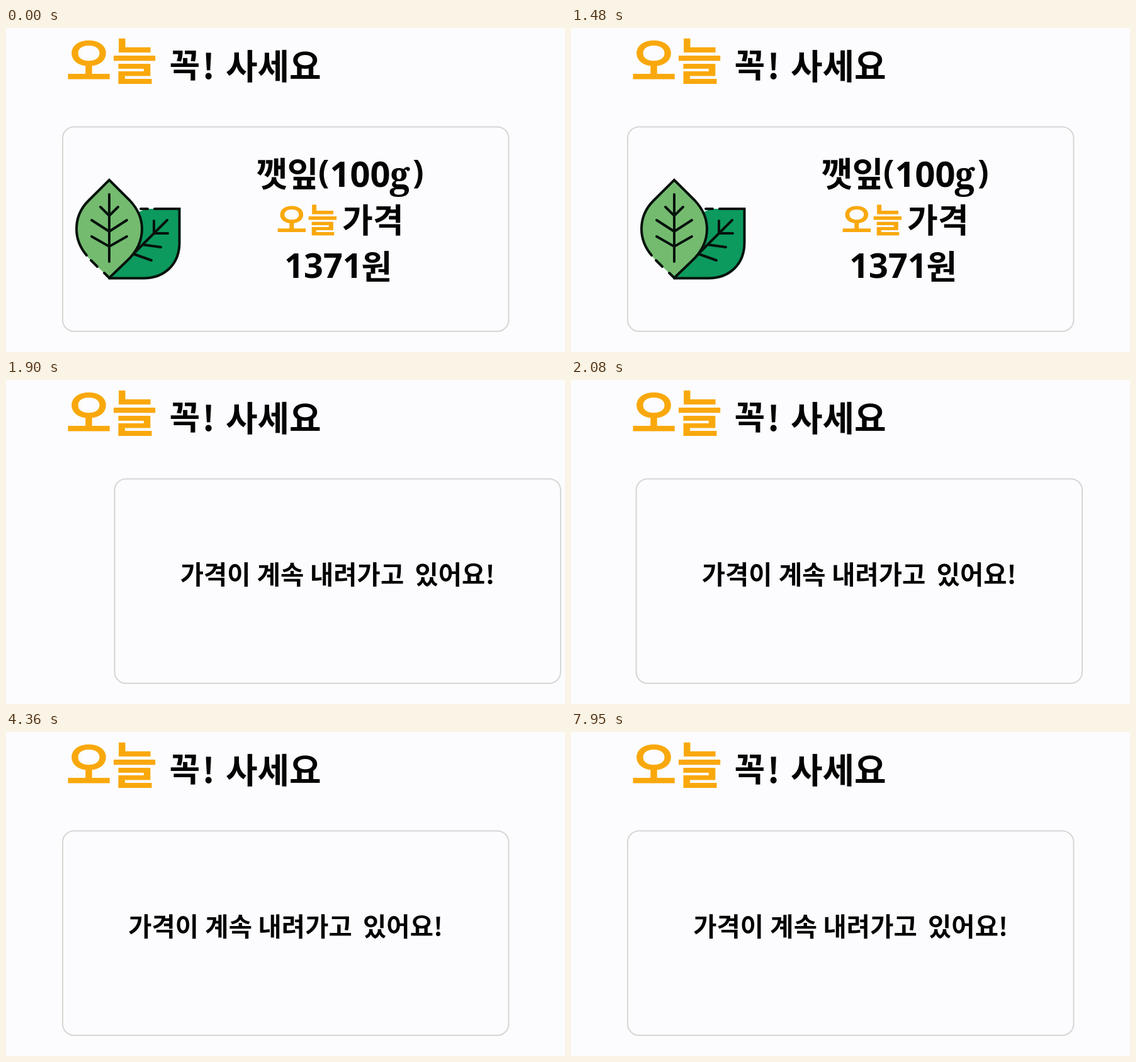
An HTML page with a canvas that plays this animation: 888x516 px, repeating every 8 s.

```html
<!DOCTYPE html>
<html lang="ko">
<head>
<meta charset="utf-8">
<style>
  html, body { margin: 0; width: 100%; height: 100%; overflow: hidden; background: #fcfcfe; }
  canvas { display: block; }
</style>
</head>
<body>
<canvas id="stage" width="888" height="516"></canvas>
<script>
const ctx = document.getElementById('stage').getContext('2d');
const LOOP = 8000, PITCH = 888;
const SLIDE_START = 1501, SLIDE_TIME = 893;
const HOLDS = [[1660, 1760], [2080, 2180]];
const INK = '#030303', AMBER = '#f9a80c', BORDER = '#d6d6d4';
const KOREAN = '"Noto Sans CJK KR", "Noto Sans CJK", sans-serif';
const DIGITS = '"Noto Sans", "Open Sans", sans-serif';
const SERIF = '"Noto Serif", serif';

// Places a run so that the centre of its visible ink is at (x, y).
function label(text, x, y, size, color = INK, family = KOREAN, weight = 900) {
  ctx.font = `${weight} ${size}px ${family}`;
  ctx.fillStyle = color;
  const m = ctx.measureText(text);
  ctx.fillText(text,
    x + (m.actualBoundingBoxLeft - m.actualBoundingBoxRight) / 2,
    y + (m.actualBoundingBoxAscent - m.actualBoundingBoxDescent) / 2);
}

function drawTitle() {
  label('오늘', 168, 52, 79, AMBER);
  label('꼭', 284, 60, 53);
  label('!', 322, 60, 55);
  label('사세요', 424.5, 60, 55);
}

function drawFrame() {
  ctx.strokeStyle = BORDER;
  ctx.lineWidth = 2;
  ctx.beginPath();
  ctx.roundRect(90, 157.5, 708.5, 325.5, 18);
  ctx.stroke();
}

const leafShapes = {
  dark: new Path2D('M164 398H218C252 398 275.5 376 275.5 342V288H222L196 300Z'),
  darkEdge: new Path2D('M164 398.5H218C252 398.5 275.5 376 275.5 342V288H236M225 288H214'),
  darkVeins: new Path2D('M256 306L180 382M235 307V327H257M217 345L246 349M203 360L231 370'),
  light: new Path2D('M164 242L131 275C118 288 112 303 112 320C112 344 124 360 137 372L164 398L192 371C206 358 216 342 216 320C216 303 209 288 197 275Z'),
  lightEdge: new Path2D('M128 362C118 350 112 337 112 320C112 303 118 288 131 275L164 242L197 275C209 288 216 303 216 320C216 342 206 358 192 371L164 398L156 390M135 370L145 380'),
  lightVeins: new Path2D('M164 265V372M150 285L164 299L178 285M136 306L164 324L192 306M136 332L164 348L192 332')
};

function drawLeaves() {
  const fill = (shape, color) => { ctx.fillStyle = color; ctx.fill(shape); };
  ctx.strokeStyle = '#07120c';
  ctx.lineWidth = 4;
  ctx.lineCap = 'round';
  ctx.lineJoin = 'miter';
  fill(leafShapes.dark, '#0c9a5e');
  ctx.stroke(leafShapes.darkEdge);
  ctx.stroke(leafShapes.darkVeins);
  fill(leafShapes.light, '#74bb70');
  ctx.stroke(leafShapes.lightEdge);
  ctx.stroke(leafShapes.lightVeins);
}

function drawPriceCard() {
  drawFrame();
  drawLeaves();
  label('깻잎', 445, 232, 54);
  label('(', 505.5, 233, 52, INK, DIGITS, 600);
  label('100', 563, 233, 56, INK, DIGITS, 700);
  label('g', 626, 245, 58, INK, SERIF, 700);
  label(')', 654.5, 233, 52, INK, DIGITS, 600);
  label('오늘', 478.5, 305.5, 53, AMBER);
  label('가격', 581, 305.5, 53);
  label('1371', 501.5, 378, 54, INK, DIGITS, 700);
  label('원', 587.5, 378.5, 53);
}

function drawNewsCard() {
  drawFrame();
  label('가격이', 248.5, 310, 40.5);
  label('계속', 353.5, 309.5, 40.5);
  label('내려가고', 476, 309.5, 40.5);
  label('있어요!', 630, 310, 40.5);
}

function slideOffset(time) {
  const hold = HOLDS.find(([from, to]) => time >= from && time < to);
  const t = hold ? hold[0] : time;
  const u = Math.min(1, Math.max(0, (t - SLIDE_START) / SLIDE_TIME));
  return PITCH * (1 - (1 - u) ** 4);
}

function drawCardAt(x, draw) {
  if (Math.abs(x) >= PITCH) return;
  ctx.save();
  ctx.translate(x, 0);
  draw();
  ctx.restore();
}

function render(now) {
  const offset = slideOffset(now % LOOP);
  ctx.fillStyle = '#fcfcfe';
  ctx.fillRect(0, 0, 888, 516);
  drawTitle();
  drawCardAt(-offset, drawPriceCard);
  drawCardAt(PITCH - offset, drawNewsCard);
}

const start = performance.now();
function tick() {
  render(performance.now() - start);
  requestAnimationFrame(tick);
}
tick();
</script>
</body>
</html>
```
